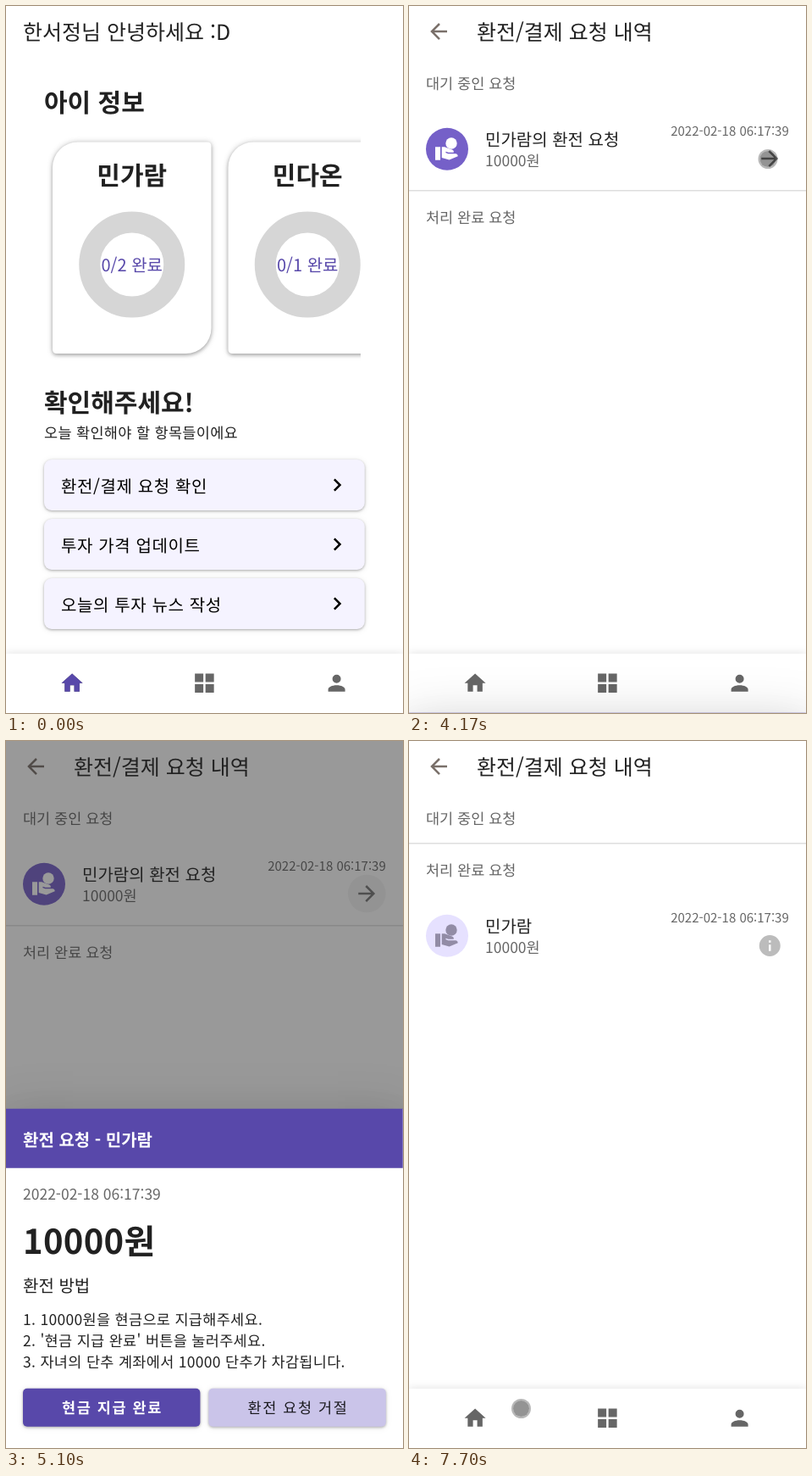
Write an HTML page that moves like this. It is 469 by 834 pixels and loops after 8000 ms.

```html
<!DOCTYPE html>
<html lang="ko">
<head>
<meta charset="utf-8">
<style>
html, body { margin: 0; width: 100%; height: 100%; overflow: hidden; background: #fff; }
#stage { position: relative; width: 469px; height: 834px; overflow: hidden; background: #fff; }
#stage > * { position: absolute; left: 0; top: 0; }
svg { display: block; overflow: visible; fill: rgba(0,0,0,.87); text-rendering: geometricPrecision;
  font-family: "Noto Sans CJK KR", "Noto Sans CJK", "Noto Sans KR", sans-serif; }
.dim { fill: rgba(0,0,0,.6); }
.body { letter-spacing: .0178em; }
.item { letter-spacing: .03125em; fill: #000; }
.btn { letter-spacing: .0893em; font-weight: 500; }
.b { font-weight: 700; }
.sum { font-weight: 700; letter-spacing: .0073em; }
.mid { text-anchor: middle; }
.card { filter: drop-shadow(0 2px 2px rgba(0,0,0,.24)) drop-shadow(0 0 3px rgba(0,0,0,.22)); }
.row { filter: drop-shadow(0 1.5px 1.5px rgba(0,0,0,.28)) drop-shadow(0 1px 3px rgba(0,0,0,.1)); }
.bar { filter: drop-shadow(0 -1px 5px rgba(0,0,0,.1)); }
#shade { width: 469px; height: 834px; background: #212121; }
#stage > #sheet { top: 434px; width: 469px; height: 400px; background: #fff;
  box-shadow: 0 14px 19px -9px rgba(0,0,0,.2), 0 30px 48px 4px rgba(0,0,0,.14), 0 11px 58px 10px rgba(0,0,0,.12); }
#cursor { width: 19px; height: 19px; border: 2px solid rgba(0,0,0,.28); border-radius: 50%;
  background: rgba(0,0,0,.42); background-clip: padding-box; }
</style>
</head>
<body>
<div id="stage"><svg id="page" width="469" height="834"></svg><div id="shade"></div>
<div id="sheet"></div><div id="cursor"></div></div>
<script>
const PURPLE = '#5848aa', CHILD = '민가람', DATE = '2022-02-18 06:17:39';
const $ = id => document.getElementById(id);
const show = (id, on) => { $(id).style.display = on ? '' : 'none'; };

const text = (x, y, size, str, cls = '', attr = '') =>
  `<text x="${x}" y="${y}" font-size="${size}" class="${cls}" ${attr}>${str}</text>`;
const rect = (x, y, w, h, fill, r = 0, attr = '') =>
  `<rect x="${x}" y="${y}" width="${w}" height="${h}" rx="${r}" fill="${fill}" ${attr}/>`;
const dot = (x, y, r, fill, attr = '') => `<circle cx="${x}" cy="${y}" r="${r}" fill="${fill}" ${attr}/>`;
// 24-unit icon drawn 30px wide around a centre
const icon = (x, y, d, fill, attr = '') =>
  `<path transform="translate(${x - 15} ${y - 15}) scale(1.25)" d="${d}" fill="${fill}" ${attr}/>`;
const clip = (id, shape) => `<clipPath id="${id}">${shape}</clipPath>`;

const ICON = {
  home: 'M10 20V14H14V20H19V12H22L12 3 2 12H5V20Z',
  grid: 'M3 11H11V3H3ZM3 21H11V13H3ZM13 21H21V13H13ZM13 3V11H21V3Z',
  user: 'M12 4A4 4 0 0 1 12 12A4 4 0 0 1 12 4M12 14C16.42 14 20 15.79 20 18V20H4V18C4 15.79 7.58 14 12 14Z',
  back: 'M20 11V13H8L13.5 18.5 12.08 19.92 4.16 12 12.08 4.08 13.5 5.5 8 11Z',
  next: 'M4 11V13H16L10.5 18.5 11.92 19.92 19.84 12 11.92 4.08 10.5 5.5 16 11Z',
  chevron: 'M8.59 16.58L13.17 12 8.59 7.41 10 6l6 6-6 6Z',
  info: 'M13 9H11V7H13ZM13 17H11V11H13ZM12 2A10 10 0 0 0 12 22A10 10 0 0 0 12 2Z'
};

function child(x, name, count) {
  const mid = x + 93.75;
  return `<path class="card" fill="#fff" d="M${x + 30} 160.5H${x + 182.5}q5 0 5 5V380a30 30 0 0 1-30 30H${x + 5}q-5 0-5-5V190.5a30 30 0 0 1 30-30Z"/>` +
    text(mid, 211, 30, name, 'b mid') +
    dot(mid, 305, 50, 'none', 'stroke="#d6d6d6" stroke-width="25"') +
    text(mid, 313, 20, count + ' 완료', 'mid', `style="fill:${PURPLE}"`);
}

const task = (str, i) => {
  const y = 535 + 70 * i;
  return rect(45, y, 378.75, 60, '#f5f3ff', 9, 'class="row"') + text(65, y + 38.5, 20, str, 'item') +
    icon(391.25, y + 30, ICON.chevron, '#000');
};

// List entry: avatar, name, amount and date
const entry = (dy, name, bg, fg) => `<g transform="translate(0 ${dy})">` +
  dot(45, 168.75, 25, bg) +
  `<g transform="translate(45 168.75)" fill="${fg}"><circle cx="5" cy="-6.8" r="6.7"/>
   <path d="M-14-2.5h6V13h-6ZM-6.3-2.5h3.4L6.5 1q2 1 1.2 3H1.5L-1.3 3l-.5 1.3L1.2 5.6H10q2.7.3 2.7 3L2.6 12.7-6.3 10.2Z"/></g>` +
  text(90, 164.5, 20, name) + text(90, 189, 17.5, '10000원', 'dim') +
  text(448.75, 152.5, 15, DATE, 'dim', 'text-anchor="end"') + '</g>';

const done = dy => `<g transform="translate(0 ${dy})">` + rect(0, 120, 469, 1.5, '#dedede') +
  text(20, 158.5, 17.5, '처리 완료 요청', 'dim') + '</g>';

$('page').innerHTML =
  clip('scroller', rect(45, 140, 374, 290, '#000')) + clip('firstTask', rect(45, 535, 378.75, 60, '#000', 9)) +
  '<g id="main">' + text(20, 40, 25, '한서정님 안녕하세요 :D') + text(45, 125, 30, '아이 정보', 'b') +
  '<g clip-path="url(#scroller)">' + child(55, CHILD, '0/2') + child(262.5, '민다온', '0/1') + '</g>' +
  text(45, 479, 30, '확인해주세요!', 'b') + text(45, 510, 17.5, '오늘 확인해야 할 항목들이에요', 'body') +
  ['환전/결제 요청 확인', '투자 가격 업데이트', '오늘의 투자 뉴스 작성'].map(task).join('') +
  '<g clip-path="url(#firstTask)">' + dot(211.5, 560.5, 0, '#000', 'id="tapTask"') + '</g></g>' +
  '<g id="list">' + icon(35, 30, ICON.back, '#7a706a') + text(80, 40, 25, '환전/결제 요청 내역') +
  text(20, 97.5, 17.5, '대기 중인 요청', 'dim') +
  '<g id="pending">' + entry(0, CHILD + '의 환전 요청', '#7560c8', '#fff') +
  dot(426.25, 180, 22.5, '#000', 'id="focus" opacity=".045"') + dot(426.25, 180, 0, '#000', 'id="tapNext"') +
  icon(426.25, 180, ICON.next, '#757575') + done(97) + '</g>' +
  '<g id="settled">' + done(0) + '<g id="paid">' + entry(61, CHILD, '#e6e1ff', '#928ca6') +
  icon(426.25, 241.5, ICON.info, '#bcbcbc', 'fill-rule="evenodd"') + '</g></g></g>' +
  rect(0, 764, 469, 70, '#fff', 0, 'class="bar"') +
  icon(78.1, 798.75, ICON.home, '#666') + icon(78.1, 798.75, ICON.home, PURPLE, 'id="active"') +
  icon(234.4, 798.75, ICON.grid, '#666') + icon(390.6, 798.75, ICON.user, '#666');

$('sheet').innerHTML = '<svg width="469" height="400" viewBox="0 434 469 400">' +
  clip('pay', rect(20, 763.75, 209.4, 45, '#000', 5)) +
  rect(0, 433.75, 468.75, 70, PURPLE) + text(20, 477.5, 20, '환전 요청 - ' + CHILD, 'b', 'fill="#fff"') +
  text(20, 541, 17.5, DATE, 'dim') + text(20, 605, 40, '10000원', 'sum') + text(20, 650, 20, '환전 방법') +
  ['1. 10000원을 현금으로 지급해주세요.', "2. '현금 지급 완료' 버튼을 눌러주세요.", '3. 자녀의 단추 계좌에서 10000 단추가 차감됩니다.']
    .map((s, i) => text(20, 689 + 25 * i, 17.5, s, 'body')).join('') +
  rect(20, 763.75, 209.4, 45, PURPLE, 5, 'class="row"') +
  rect(239.4, 763.75, 209.4, 45, '#cac4e9', 5, 'class="row"') +
  '<g clip-path="url(#pay)">' + dot(132.5, 787.5, 0, '#fff', 'id="tapPay"') + '</g>' +
  text(125.5, 793, 17.5, '현금 지급 완료', 'btn b mid', 'fill="#fff"') +
  text(345, 793, 17.5, '환전 요청 거절', 'btn mid') + '</svg>';

const clamp = v => Math.min(1, Math.max(0, v));
function bezier(x1, y1, x2, y2, x) {
  const at = (a, b, s) => 3 * (1 - s) ** 2 * s * a + 3 * (1 - s) * s * s * b + s ** 3;
  let lo = 0, hi = 1;
  for (let i = 0; i < 24; i++) {
    const m = (lo + hi) / 2;
    if (at(x1, x2, m) < x) lo = m; else hi = m;
  }
  return at(y1, y2, lo);
}
const easeSheet = v => bezier(.25, .8, .25, 1, clamp(v));
const easeShade = v => bezier(.25, .8, .5, 1, clamp(v));

function ripple(id, t, start, radius, alpha, fade) {
  const on = t >= start ? 1 : 0;
  $(id).setAttribute('r', on * radius * (.3 + .7 * easeShade((t - start) / 200)));
  $(id).setAttribute('opacity', on * alpha * (1 - clamp((t - fade) / 250)));
}

// Start time and place of the touch cursor; no place means hidden
const TOUCH = [[0], [495, 212, 561.5], [895, 215.5, 561], [960, 211.5, 560.5], [2760],
  [3430, 413.5, 183.5], [3895, 424, 180.5], [5095], [6030, 132.5, 787.5], [7160], [7230, 132.5, 787.5]];

const OPEN = 1490, LOADED = 1690, RAISE = 4170, PAID = 7405;

function draw(t) {
  show('main', t < OPEN);
  show('list', t >= OPEN);
  $('active').setAttribute('opacity', 1 - clamp((t - OPEN) / 300));
  const pending = t >= LOADED && t < PAID;
  show('pending', pending);
  show('settled', !pending);
  show('paid', t >= PAID);
  show('focus', t >= RAISE + 10);

  ripple('tapTask', t, 1290, 260, .12, 1450);
  ripple('tapNext', t, RAISE + 10, 22.5, .14, 4390);
  ripple('tapPay', t, 7225, 130, .25, 7400);

  show('sheet', t >= RAISE - 10 && t < PAID);
  $('sheet').style.transform = `translateY(${400 * (1 - easeSheet((t - RAISE) / 300))}px)`;
  $('shade').style.opacity = .46 * (easeShade((t - RAISE) / 300) - easeShade((t - PAID) / 300));

  const [, x, y] = TOUCH.filter(p => p[0] <= t).pop();
  show('cursor', x !== undefined);
  if (x) $('cursor').style.transform = `translate(${x - 11.5}px, ${y - 11.5}px)`;
}

// The screen is redrawn 15 times per second
const STEP = 200 / 3;
const begin = performance.now();
function tick() {
  const t = (performance.now() - begin) % 8000;
  draw(Math.max(0, Math.floor((t + .01) / STEP - .5) * STEP + STEP / 2));
  requestAnimationFrame(tick);
}
draw(0);
tick();
</script>
</body>
</html>
```
